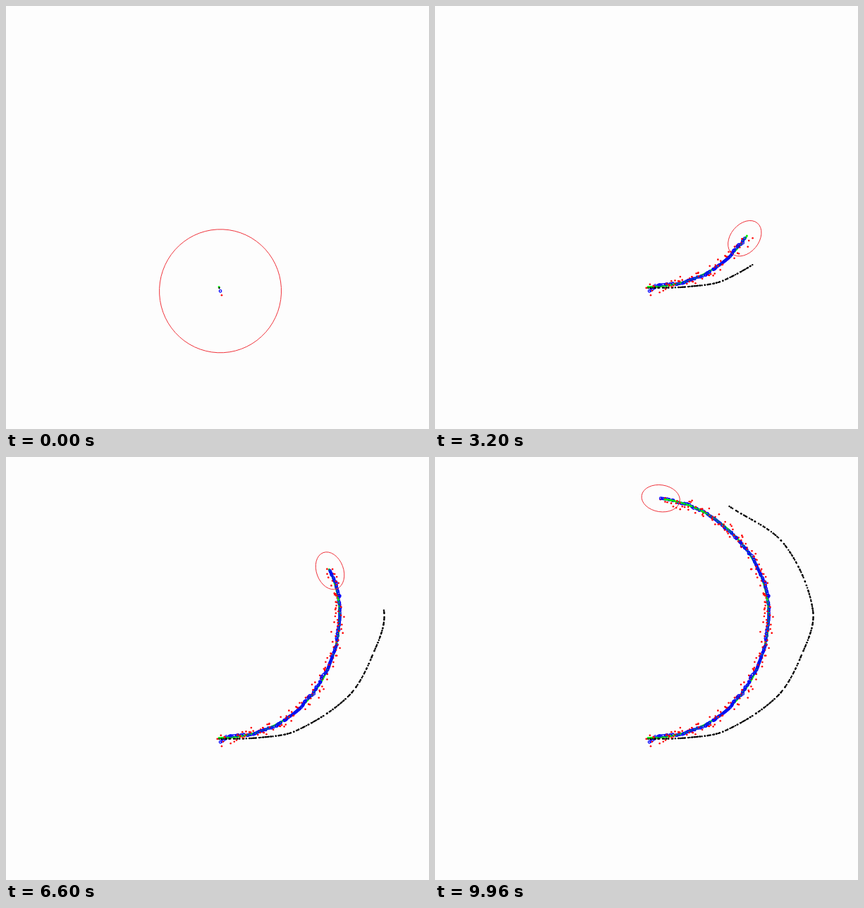
An HTML page with a canvas that plays this animation: 600 px wide and 600 px high, repeating every 10 s.

```html
<!DOCTYPE html>
<html lang="en">
<head>
<meta charset="utf-8">
<title>Localization tracks</title>
<style>
html, body { margin: 0; width: 100%; height: 100%; overflow: hidden; background: #fdfdfd; }
canvas { display: block; width: 600px; height: 600px; }
</style>
</head>
<body>
<canvas id="stage" width="600" height="600"></canvas>
<script>
const ctx = document.getElementById('stage').getContext('2d');
const STEPS = 250, STEP_MS = 40, TAU = 2 * Math.PI;

// Key poses: step, angle of the estimate, dead reckoning x and y
const keys = [
  [0, .006, 302.5, 400], [30, .355, 360, 398], [57, .666, 411, 388.5], [103, 1.204, 485.5, 339.5],
  [131, 1.582, 518, 285.5], [165, 1.979, 536, 217.5], [211, 2.555, 494, 122], [249, 3.041, 417.5, 70]
];

let seed = 20;
function rand() {
  seed = (seed * 1664525 + 1013904223) % 4294967296;
  return seed / 4294967296;
}
const swing = size => (rand() + rand() - 1) * size;

function segment(k) {
  let i = 0;
  while (i < keys.length - 2 && keys[i + 1][0] <= k) i++;
  return [i, (k - keys[i][0]) / (keys[i + 1][0] - keys[i][0])];
}

function slope(i, col) {
  const a = keys[Math.max(0, i - 1)], b = keys[Math.min(keys.length - 1, i + 1)];
  return (b[col] - a[col]) / (b[0] - a[0]);
}

// Smooth cubic through one column of the key poses
function spline(k, col) {
  const [i, f] = segment(k);
  const p = keys[i][col], q = keys[i + 1][col], span = keys[i + 1][0] - keys[i][0];
  const g = 1 - f;
  return p * g * g * (1 + 2 * f) + q * f * f * (3 - 2 * f)
    + span * f * g * (slope(i, col) * g - slope(i + 1, col) * f);
}

const angle = k => spline(k, 1);
const wave = k => 1.2 * Math.cos((k - 148) / 15.5);
const settle = k => 6.5 * Math.exp(-k / 8) * Math.cos(k / 3);
const polar = (ang, r) => [303 + r * Math.sin(ang), 229 + r * Math.cos(ang)];

const steps = [];
let wander = 0;
for (let k = 0; k < STEPS; k++) {
  const loose = Math.sin(Math.PI * segment(k)[1]);
  wander = .7 * wander + swing(1.7);
  const est = polar(angle(k) + swing(4) * loose / 170, 170 + wave(k) + settle(k) + wander * loose);
  const truth = polar(.0121 * k - .005, 170 + wave(k) / 2);
  const late = k ? Math.min(STEPS - 1, k + swing(1.3)) : 0;
  const dead = [spline(late, 2), spline(late, 3)];
  // The first estimate lies halfway between truth and measurement.
  const seen = truth.map((v, n) => k ? v + swing(11) : 2 * est[n] - v);
  steps.push({ est, truth, dead, seen });
}

function circle([x, y], r) {
  ctx.beginPath();
  ctx.arc(x, y, r, 0, TAU);
}

function dot(p, r, color) {
  circle(p, r);
  ctx.fillStyle = color;
  ctx.fill();
}

function ring(p, r, color) {
  circle(p, r);
  ctx.lineWidth = 1.2;
  ctx.strokeStyle = color;
  ctx.stroke();
}

// The uncertainty shrinks to a steady ellipse that follows the heading.
function drawSpread(k) {
  const doubt = Math.exp(-k / 40) / Math.sqrt(1 + k);
  const a = 27.3 + 59.2 * doubt, b = 19 + 68.5 * doubt;
  ctx.beginPath();
  ctx.ellipse(...steps[k].est, a, b, .05 - angle(k), 0, TAU);
  ctx.lineWidth = 1;
  ctx.strokeStyle = '#f0343c';
  ctx.stroke();
}

function draw(time) {
  const last = Math.floor(time / STEP_MS) % STEPS;
  ctx.fillStyle = '#fdfdfd';
  ctx.fillRect(0, 0, 600, 600);
  for (const s of steps.slice(0, last + 1)) {
    dot(s.truth, 1.5, '#00f000');
    ring(s.est, 1.75, '#0000ff');
    dot(s.dead, 1.2, '#000');
    dot(s.seen, 1.3, '#ff0000');
  }
  drawSpread(last);
}

let start;
function tick(now) {
  if (start === undefined) start = now;
  draw(Math.max(0, now - start));
  requestAnimationFrame(tick);
}
draw(0);
requestAnimationFrame(tick);
</script>
</body>
</html>
```
